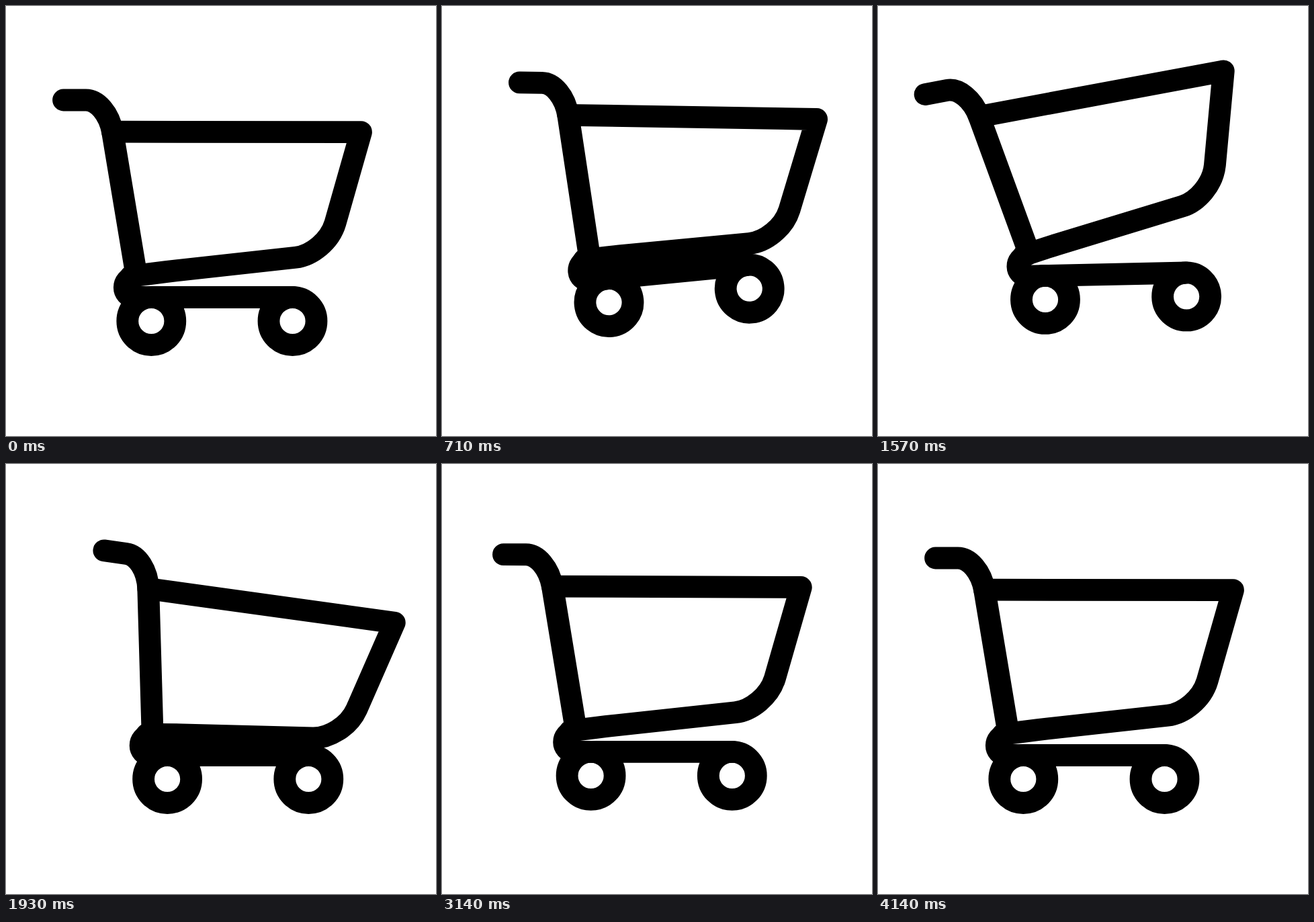
Animation of 640x640 px, one loop 4210 ms. Source, as an HTML page:

```html
<!DOCTYPE html>
<html lang="en">
<head>
<meta charset="utf-8">
<title>Shopping cart</title>
<style>
  html, body { margin: 0; height: 100%; overflow: hidden; background: #fff; }
  svg { display: block; width: 100%; height: 100%; }
</style>
</head>
<body>
<svg viewBox="0 0 640 640" fill="none" stroke="#000" stroke-width="32.8" stroke-linecap="round" stroke-linejoin="round">
  <g id="chassis">
    <path d="M190 402C182 405 176.3 411 176.3 419C176.3 426 182 433.5 190 433.5H426.5"/>
    <circle cx="216.3" cy="469" r="35.5"/>
    <circle cx="426.5" cy="469" r="35.5"/>
  </g>
  <g id="basket">
    <path d="M85.5 140H119C136 140 153.5 160 158.5 187.3L193 394"/>
    <path d="M158.5 187.2L528.5 187.7L490 323C482 350 455 371.5 431 374.3L238 395.6Q205 399.6 185.5 402.6"/>
  </g>
</svg>
<script>
const LOOP = 4210, FPS = 14;
const PIVOT = '185.5 402.6';

// Each hop is a flattened arc; the chassis pitches nose-up until `level`, then nose-down
const hops = [
  { from: 6.6, to: 27, height: 38.5, pitch: 16, level: .865 },
  { from: 28, to: 40, height: 24, pitch: 16, level: .51 },
  { from: 42, to: 51, height: 6.6, pitch: 0, level: .5 },
];

function hopAt(n) {
  const hop = hops.find(h => n > h.from && n < h.to);
  if (!hop) return { y: 0, tilt: 0 };
  const u = (n - hop.from) / (hop.to - hop.from);
  return {
    y: -hop.height * (1 - Math.abs(2 * u - 1) ** 2.5),
    tilt: hop.pitch * Math.sin(Math.PI * u) * (u - hop.level),
  };
}

// Smooth curve through [step, value] keys that never overshoots them
function track(...keys) {
  const slope = i => (keys[i + 1][1] - keys[i][1]) / (keys[i + 1][0] - keys[i][0]);
  const tangent = i => {
    if (!i || i === keys.length - 1) return 0;
    const p = slope(i - 1), q = slope(i);
    return p * q > 0 ? 2 * p * q / (p + q) : 0;
  };
  return n => {
    let i = 0;
    while (i < keys.length - 2 && n >= keys[i + 1][0]) i++;
    const [n0, v0] = keys[i], [n1, v1] = keys[i + 1];
    const d = n1 - n0, u = Math.min(1, Math.max(0, (n - n0) / d)), w = 1 - u;
    return v0 * w * w * (1 + 2 * u) + v1 * u * u * (3 - 2 * u)
      + d * u * w * (w * tangent(i) - u * tangent(i + 1));
  };
}

// Leap forward, then roll slowly back
const shiftX = track([6, 0], [8, 17], [15, 38.5], [27, 23.8], [36, 14.3], [44, 5.3], [51, 0]);
// Rock forward on every landing, back on every hop
const basketTilt = track([0, 0], [6.5, 7], [16, -12.9], [24, -9], [27, 7.8], [36, .27],
  [38, -2.4], [40, 5.3], [46.5, -2.4], [51, .4], [56, 0]);

const chassis = document.getElementById('chassis');
const basket = document.getElementById('basket');

function draw(time) {
  const n = Math.floor((time % LOOP + 5) * FPS / 1000);
  const { y, tilt } = hopAt(n);
  const move = `translate(${shiftX(n)} ${y})`;
  chassis.setAttribute('transform', `${move} rotate(${tilt} ${PIVOT})`);
  basket.setAttribute('transform', `${move} rotate(${basketTilt(n)} ${PIVOT})`);
}

const start = performance.now();
(function tick() {
  draw(performance.now() - start);
  requestAnimationFrame(tick);
})();
</script>
</body>
</html>
```
